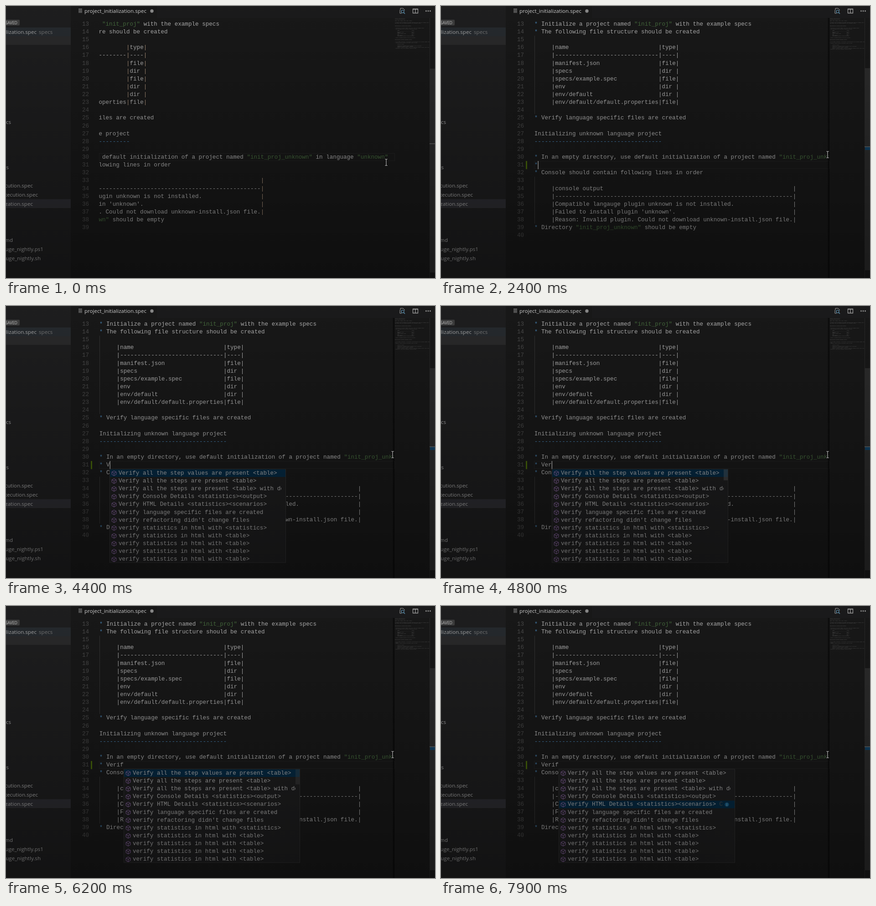
Write an HTML page that moves like this. It is 941x595 px and loops after 8 s.

```html
<!DOCTYPE html>
<html lang="en">
<head>
<meta charset="utf-8">
<title>Step completion</title>
<style>
html, body { margin: 0; width: 100%; height: 100%; overflow: hidden; background: #141414; }
svg { display: block; }
text { white-space: pre; }
.code { font: 12.6px "Liberation Mono", monospace; fill: #d4d4d4; }
.ui { font: 11.6px "Open Sans", "Noto Sans", sans-serif; fill: #ccc; }
.end { text-anchor: end; }
.num { fill: #5a5a5a; }
.str { fill: #54804a; }
.star, .rule { fill: #569cd6; }
.warm .pipe { fill: #c8ab90; }
.line { fill: none; stroke: #c5c5c5; }
</style>
</head>
<body>
<svg id="stage" width="941" height="595" viewBox="0 0 941 595">
  <defs>
    <linearGradient id="shade" x1="0" y1="0" x2="0" y2="1">
      <stop offset="0" stop-opacity=".2"/>
      <stop offset="1" stop-opacity=".5"/>
    </linearGradient>
    <linearGradient id="edge">
      <stop offset="0" stop-opacity="0"/>
      <stop offset="1" stop-opacity=".7"/>
    </linearGradient>
    <clipPath id="pane"><path d="M204 26H852V595H204Z"/></clipPath>
    <clipPath id="mapPane"><path d="M852 26H929V595H852Z"/></clipPath>
    <g id="cube" fill="none" stroke="#a77bc4" stroke-width="1" stroke-linejoin="round">
      <path d="M0-5.2 4.8-2.7V2.8L0 5.3-4.8 2.8V-2.7ZM-4.8-2.7 0-.2 4.8-2.7M0-.2V5.3"/>
    </g>
  </defs>
  <rect width="941" height="595" fill="#1e1e1e"/>
  <rect x="331" width="610" height="26" fill="#212122"/>
  <g id="side"></g>
  <g id="tab">
    <path class="line" d="M159 6.5h8M159 9h8M159 11.5h8M159 14h8" stroke-width="1.1"/>
    <text class="ui" x="172" y="14.5" style="fill:#fff">project_initialization.spec</text>
    <circle cx="320" cy="11" r="3.7" fill="#a8a8a8"/>
    <path class="line" d="M865 9V5h6l3 3v2M864 9v7h4" stroke="#75a9c9"/>
    <circle cx="870" cy="12" r="3" fill="none" stroke="#75b7dd" stroke-width="1.2"/>
    <path d="M872 14l3 3" stroke="#75b7dd" stroke-width="1.4"/>
    <path class="line" d="M892.5 6.5h11v9h-11zM898 6v10M892 7h12" stroke-width="1.3"/>
    <g fill="#c5c5c5">
      <circle cx="921.5" cy="11" r="1.4"/><circle cx="926" cy="11" r="1.4"/><circle cx="930.5" cy="11" r="1.4"/>
    </g>
  </g>
  <g id="view"></g>
  <rect width="941" height="595" fill="url(#shade)"/>
  <g id="mouse" fill="none" stroke-linecap="square">
    <path d="M-2.5-7H-1Q0-7 0-6 0-7 1-7H2.5M0-6V6M-2.5 7H-1Q0 7 0 6 0 7 1 7H2.5" stroke="#000" stroke-width="3"/>
    <path d="M-2.5-7H-1Q0-7 0-6 0-7 1-7H2.5M0-6V6M-2.5 7H-1Q0 7 0 6 0 7 1 7H2.5" stroke="#c4c4c4" stroke-width="1.2"/>
  </g>
</svg>
<script>
const LOOP = 8000, LEFT = 204.8, CHAR = 7.56, ROW = 17.12, FIRST = 13;
const $ = id => document.getElementById(id);

const tableRow = (name, type) => `     |${name.padEnd(30)}|${type.padEnd(4)}|`;
const outRow = s => `     |${s.padEnd(69)}|`;
const base = [
  'Project initialization',
  '======================',
  '',
  'tags: init, smoke, java, ruby, csharp',
  '',
  'A project can be created in an empty directory with the init command and a language name',
  'The files that are created depend on the language plugin',
  '',
  '',
  'Initializing a project with example',
  '-----------------------------------',
  '',
  '* Initialize a project named "init_proj" with the example specs',
  '* The following file structure should be created',
  '',
  tableRow('name', 'type'),
  tableRow('-'.repeat(30), '----'),
  tableRow('manifest.json', 'file'),
  tableRow('specs', 'dir'),
  tableRow('specs/example.spec', 'file'),
  tableRow('env', 'dir'),
  tableRow('env/default', 'dir'),
  tableRow('env/default/default.properties', 'file'),
  '',
  '* Verify language specific files are created',
  '',
  'Initializing unknown language project',
  '-'.repeat(37),
  '',
  '* In an empty directory, use default initialization of a project named "init_proj_unknown" in language "unknown"',
  '* Console should contain following lines in order',
  '',
  outRow('console output'),
  outRow('-'.repeat(69)),
  outRow('Compatible langauge plugin unknown is not installed.'),
  outRow("Failed to install plugin 'unknown'."),
  outRow('Reason: Invalid plugin. Could not download unknown-install.json file.'),
  '* Directory "init_proj_unknown" should be empty',
  ''
];

const tagItems = [
  '<hadjka> to specification <newspec>',
  ...Array(3).fill('<tag1, tag2> to scenario <second scenario>'),
  ...Array(3).fill('<tag1,tag2,tag3> to specification <First Spec>'),
  '<tag1,tag2> to specification <Second Spec>',
  '<tag1,tag4> to specification <Third Spec>',
  '<tag1> to scenario <first scenario> in spec',
  '<tag1> to scenario <first scenario> in spec',
  '<tag1> to specification <tags_expression>'
].map(s => 'Add tags ' + s);
const stepItems = [
  'Verify all the step values are present <table>',
  'Verify all the steps are present <table>',
  'Verify all the steps are present <table> with details',
  'Verify Console Details <statistics><output>',
  'Verify HTML Details <statistics><scenarios>',
  'Verify language specific files are created',
  "verify refactoring didn't change files",
  'verify statistics in html with <statistics>',
  ...Array(4).fill('verify statistics in html with <table>')
];

// Step tables: [start ms, value]
const typed = [[0, null], [1100, ''], [2400, '*'], [2500, '* '], [4400, '* V'], [4500, '* Ve'],
  [4800, '* Ver'], [5200, '* Veri'], [5400, '* Verif']];
const caretOn = [[0, 0], [600, 1], [1600, 0], [2100, 1], [3000, 0], [3500, 1], [4000, 0], [4400, 1],
  [5900, 0], [6400, 1], [6900, 0], [7400, 1], [7900, 0]];
const picked = [[0, 0], [6300, 1], [6400, 2], [6600, 3], [7400, 4]];
const sliderAlpha = [[0, 1], [3000, .7], [3100, .3], [3300, 0], [4500, 1], [5900, .9], [6000, .8],
  [6100, .7], [6200, .6], [6300, .3], [6400, 0]];
const mousePath = [[0, [834, 342]], [100, [838, 338]], [200, [844, 329]], [300, [848, 325]]];
const at = (table, t) => table.findLast(([start]) => start <= t)[1];

const esc = s => s.replace(/&/g, '&amp;').replace(/</g, '&lt;');
const span = (cls, s) => `<tspan class=${cls}>${s}</tspan>`;
const rect = (x, y, w, h, fill, more = '') => `<rect x="${x}" y="${y}" width="${w}" height="${h}" fill="${fill}" ${more}/>`;
const text = (x, y, s, cls = 'code') => `<text x="${x}" y="${y}" class="${cls}">${s}</text>`;
const top_ = n => 30.9 + (n - FIRST) * ROW;

function paint(s) {
  if (/^-+$/.test(s)) return span('rule', s);
  return esc(s)
    .replace(/"[^"]*"/g, m => span('str', m))
    .replace(/^\*/, m => span('star', m))
    .replace(/\|/g, m => span('pipe', m));
}

function popup(x, items, sel, alpha, long) {
  const h = 12 * ROW - 1;
  let out = rect(.5, .5, 386, h, '#252526', 'stroke="#3c3c3c"');
  out += rect(1, 1 + sel * ROW, 385, ROW - .5, '#063352');
  let labels = '';
  items.forEach((s, i) => {
    const y = 12.7 + i * ROW;
    const detail = i === sel && i > 2 ? span('num', ' C') : '';
    out += `<use href="#cube" x="10" y="${y - 3.2}"/>`;
    labels += text(20, y, esc(s) + detail);
  });
  out += `<svg width="377" height="${h}">${labels}</svg>`;
  if (items === tagItems || sel > 2) {
    const y = 9.5 + sel * ROW;
    out += `<circle cx="369" cy="${y}" r="4.6" fill="#1d6d9f"/>` +
      `<path d="M369 ${y - 2.6}v1.2M369 ${y - .5}v3.2" stroke="#9cc" stroke-width="1.2"/>`;
  }
  out += rect(377, 1, 9, long, '#797979', `opacity="${alpha * .4}"`);
  return `<svg x="${x}" y="356.3" width="387" height="206">${out}</svg>`;
}

function view(t) {
  const entry = at(typed, t), fresh = entry === null;
  const lines = fresh ? base : [...base.slice(0, 30), entry, ...base.slice(30)];
  const shift = fresh ? 213 : 0, row = fresh ? 30 : 31;
  const col = fresh ? base[29].length : entry.length;
  const caretX = LEFT + col * CHAR - shift;

  let nums = '', code = '', map = '';
  lines.forEach((s, i) => {
    const n = i + 1, y = 43 + (n - FIRST) * ROW;
    map += text(0, 14 + i * 13, esc(s));
    if (n < FIRST) return;
    nums += text(182, y, n, 'code num end');
    code += text(LEFT - shift, y, paint(s));
  });

  const y = top_(row);
  let out = nums + rect(204.5, y + .5, 648, ROW - 1, 'none', 'stroke="#2b2b2b"');
  let marks = fresh ? '' : [[15, 25], [33, 39]].map(([a, b]) =>
    rect(205, top_(a), 1, (b - a) * ROW, '#404040')).join('');
  if (at(caretOn, t)) marks += rect(caretX, y, 1.6, 17.8, '#c8c8c8');
  out += `<g clip-path="url(#pane)" class="${fresh ? 'warm' : ''}">${marks + code}</g>`;
  if (!fresh) out += rect(847, 26, 5, 569, 'url(#edge)');
  out += `<g clip-path="url(#mapPane)"><g transform="translate(853 26) scale(.135)" opacity=".62">${map}</g></g>`;

  out += rect(929, 26, 1, 569, '#333');
  out += fresh ? rect(930, 137, 11, 446, '#363636') : rect(930, 136, 11, 442, '#363636');
  if (t >= 1300) {
    out += rect(186, y, 3, ROW + .6, '#587c0c');
    out += rect(930, 308, 11, 7, '#15507a');
  }
  out += rect(929, fresh ? 300.5 : 307, 12, 1.6, '#777');

  if (t >= 2600) {
    const tags = t < 4400;
    const long = tags ? 18 : t < 5400 ? 24 : 33;
    out += popup(Math.round(caretX), tags ? tagItems : stepItems, at(picked, t), at(sliderAlpha, t), long);
  }
  return out;
}

$('side').innerHTML =
  rect(0, 0, 142, 595, '#252526') +
  rect(0, 47, 142, 19, '#2f3439') + rect(0, 66, 142, 19, '#333334') + rect(0, 422.5, 142, 19.5, '#37373d') +
  '<rect x="-6" y="30" width="36" height="12.5" rx="2" fill="#4d4d4d"/>' +
  '<text x="25" y="39.5" class="ui end" style="font-size:8.8px;fill:#eee">1 UNSAVED</text>' +
  '<text x="72" y="60.5" class="ui" style="fill:#8f8f8f">specs</text>' +
  [[67, 60.5, 'project_initialization.spec'], [11, 258, 'specs'], [6, 357, 's'], [59, 397, 'execution.spec'],
    [70, 416.5, 'parallel_execution.spec'], [59, 436.5, 'project_initialization.spec'], [15, 516, 'README.md'],
    [82, 535.5, 'gauge_nightly.ps1'], [76, 555.5, 'gauge_nightly.sh']]
    .map(([x, y, s]) => text(x, y, s, 'ui end')).join('');

let shown = -1;
function tick() {
  const t = Math.floor(performance.now() % LOOP / 100) * 100;
  if (t !== shown) {
    shown = t;
    $('view').innerHTML = view(t);
    $('mouse').setAttribute('transform', `translate(${at(mousePath, t)})`);
  }
  requestAnimationFrame(tick);
}
tick();
</script>
</body>
</html>
```
